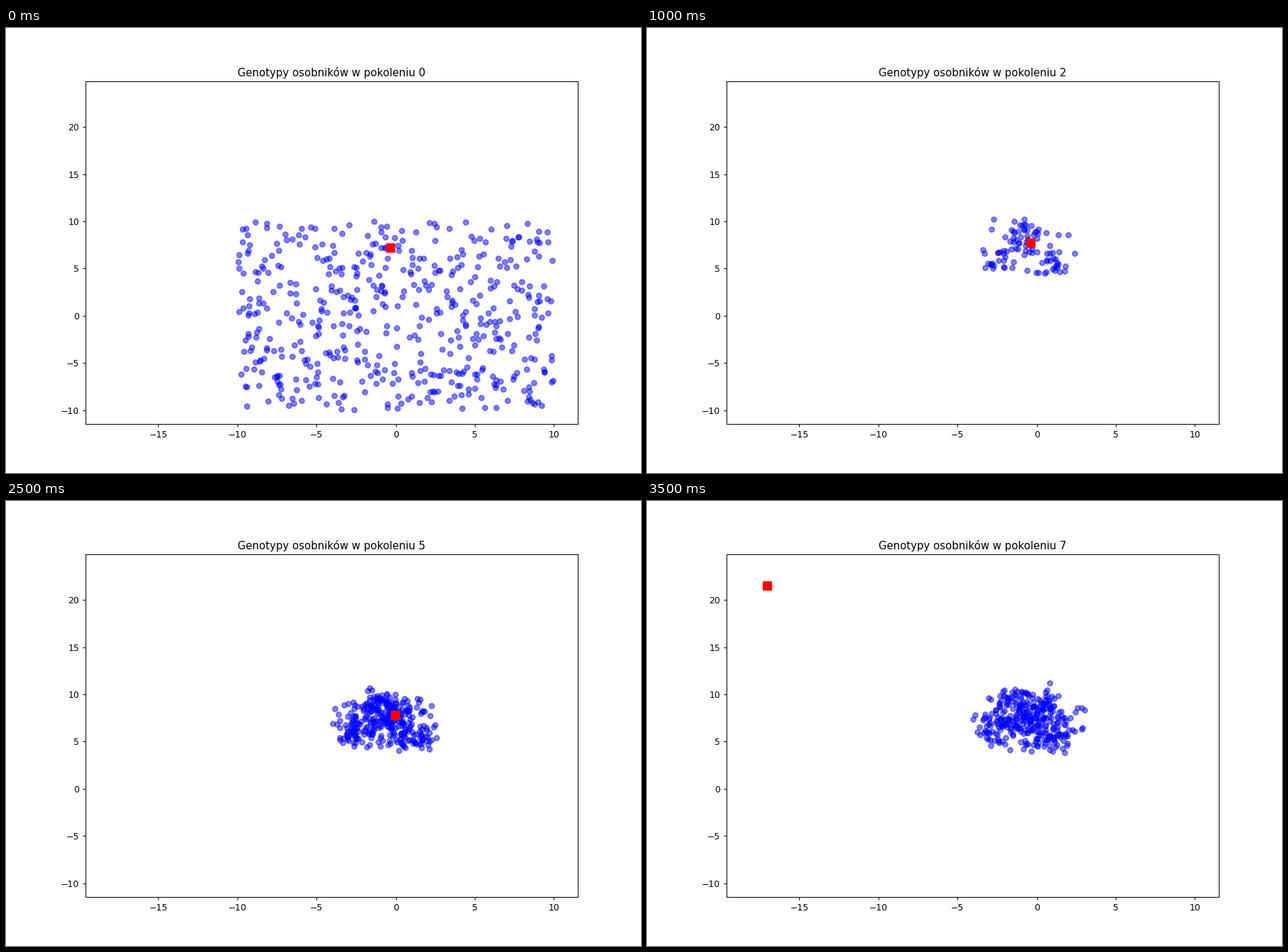
Recreate the animation shown at these times as a matplotlib script. Size 894 by 626 pixels, loop 4 s.

```python
import numpy as np
import matplotlib.pyplot as plt
from matplotlib.animation import FuncAnimation

WIDTH, HEIGHT, DPI = 894, 626, 89.4
GENERATIONS, INTERVAL = 8, 500
LIMIT = 10
TARGETS = [(-0.34, 7.2), (-0.45, 7.48), (-0.38, 7.75), (-0.29, 7.96),
           (-0.15, 7.88), (-0.03, 7.81), (0.24, 8.26), (-17.03, 21.55)]
rng = np.random.default_rng(7)


def select(points, gen):
    """Keep the points in a rounded box that drifts slowly upwards."""
    offset = np.abs(points - (-0.5, 7.1 + 0.06 * gen)) / (3.5, 3.2)
    return points[(offset ** 2.6).sum(axis=1) < 1]


def breed(points, gen):
    """Mutated copies of the selected parents; number and spread grow."""
    parents = select(points, gen)
    count = min(330, round(65 * 1.5 ** (gen - 1)))
    order = np.arange(count) % len(parents)
    return parents[order] + rng.normal(0, 0.2 + 0.045 * gen, (count, 2))


populations = [rng.uniform(-LIMIT, LIMIT, (500, 2))]
for gen in range(1, GENERATIONS):
    # Parents come in random order, so no part of the cloud is favoured.
    populations.append(breed(rng.permutation(populations[-1]), gen))

# The small margin keeps the pixel size from being rounded down.
fig, ax = plt.subplots(figsize=((WIDTH + 0.01) / DPI, (HEIGHT + 0.01) / DPI),
                       dpi=DPI)
ax.set_xlim(-19.61, 11.49)
ax.set_ylim(-11.47, 24.82)
dots = ax.scatter([], [], s=36, c="blue", alpha=0.5)
target = ax.scatter([], [], s=100, c="red", marker="s", zorder=3)
title = ax.set_title("")


def update(gen):
    dots.set_offsets(populations[gen])
    target.set_offsets([TARGETS[gen]])
    title.set_text(f"Genotypy osobników w pokoleniu {gen}")
    return dots, target, title


anim = FuncAnimation(fig, update, frames=GENERATIONS, interval=INTERVAL,
                     repeat=True, repeat_delay=0, blit=False)
plt.show()
```
